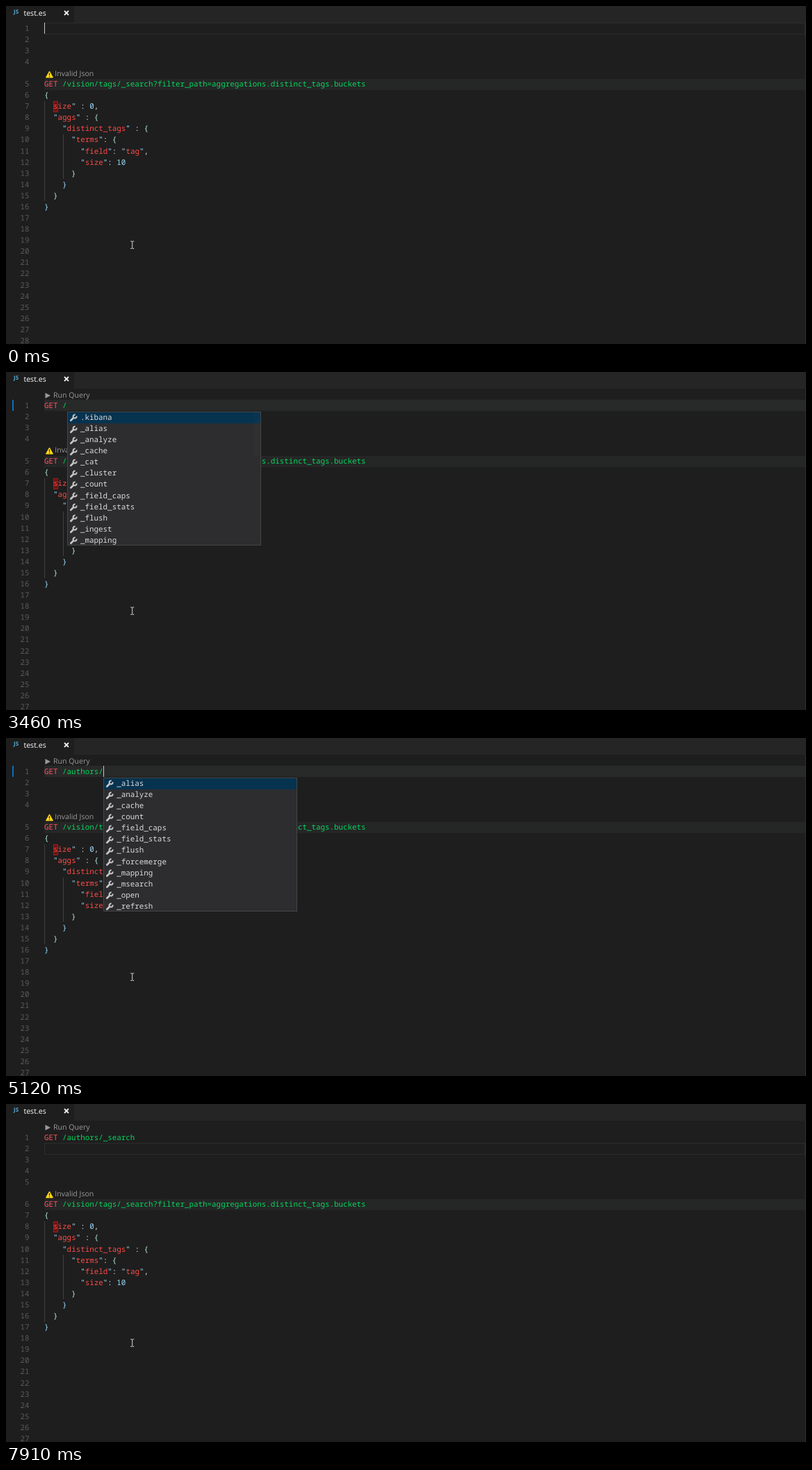
Animation, 1151 px wide and 487 px high, one loop 8000 ms. Source, as an HTML page:

```html
<!DOCTYPE html>
<html lang="en">
<head>
<meta charset="utf-8">
<title>test.es</title>
<style>
html, body { margin: 0; width: 100%; height: 100%; overflow: hidden; background: #1e1e1e; }
#stage { position: relative; width: 1151px; height: 487px; overflow: hidden; background: #1e1e1e;
  font: 500 10.875px/16.08px "Noto Sans Mono", "DejaVu Sans Mono", monospace;
  text-rendering: geometricPrecision; font-variant-ligatures: none; }
#stage div, #stage svg { position: absolute; white-space: pre; box-sizing: border-box; }
#stage .ui { font: 10.6px/16px "Open Sans", "Noto Sans", sans-serif; }
#tabs { left: 0; top: 0; width: 1151px; height: 24px; background: #252526; }
#tab { left: 0; top: 0; width: 98px; height: 24px; background: #1e1e1e; color: #fff; }
#edge { left: 1150px; top: 24px; width: 1px; height: 463px; background: #303031; }
.num, .code { margin-top: 0.6px; }
.num { left: 0; width: 33.5px; text-align: right; color: #5a5a5a; font-weight: 400; }
.code { left: 55px; color: #dcdcdc; }
.band { left: 55px; width: 1095px; height: 16px; }
.guide { width: 1px; background: #404040; }
.err { left: 68px; width: 7px; height: 16px; background: #6e1212; border: 1px solid #a01c1c; }
.lens { color: #999; height: 16px; }
.caret { width: 1px; height: 16px; background: #c4c4c2; }
.bar { left: 9px; width: 2px; background: #0b6fb8; }
.pop { width: 279px; background: #2d2d30; border: 1px solid #454545; color: #dcdcdc; overflow: hidden; }
.pop .item { left: 0; width: 277px; height: 16.08px; padding-left: 18px; }
.pop .item:first-child { background: #063350; }
.pop svg { left: 2px; top: 2.5px; }
.pop b { font-weight: 700; color: #0097fb; }
.thumb { right: 0; top: 0; width: 9px; background: #797979; }
.m { color: #ff525c; } .p { color: #04d75c; } .k { color: #ff4a46; }
.q { color: #9cdcfe; } .t { color: #b4e6dc; }
</style>
</head>
<body>
<div id="stage">
  <div id="tabs"><div id="tab" class="ui">
    <div style="left:11px;top:1px;font-size:8px;font-weight:700;color:#56a9d2">JS</div>
    <div style="left:25.4px;top:2.6px">test.es</div>
    <svg style="left:83px;top:6px" width="8" height="8"><path d="M1 1L7 7M7 1L1 7" stroke="#f0f0f0" stroke-width="1.8"/></svg>
  </div></div>
  <div id="view" style="left:0;top:0;width:1151px;height:487px"></div>
  <div id="edge"></div>
  <svg style="left:177px;top:338px" width="10" height="13"><path d="M2.2 1H4.1L4.7 1.7L5.3 1H7.2M4.7 1.5V10.8M2.2 11.4H4.1L4.7 10.7L5.3 11.4H7.2" fill="none" stroke="#d8d8d8"/></svg>
</div>
<script>
const LOOP = 8000, ROW = 16.08, CHAR = 6.525;
const view = document.getElementById('view');
const top0 = row => 24.1 + ROW * row;
const colX = col => 55.4 + CHAR * col;

const words = s => s.split(' ');
const lists = {
  verb: ['GET'],
  root: words('.kibana _alias _analyze _cache _cat _cluster _count _field_caps _field_stats _flush _ingest _mapping'),
  index: ['authors'],
  api: words('_alias _analyze _cache _count _field_caps _field_stats _flush _forcemerge _mapping _msearch _open _refresh'),
  s: words('_search _search_shards _segments _settings _shard_stores _stats _field_stats _msearch _flush _alias _refresh _field_caps'),
  se: words('_search _search_shards _segments _settings _shard_stores _msearch _cluster _suggest _search_template _msearch_template')
};

const body = [
  'GET /vision/tags/_search?filter_path=aggregations.distinct_tags.buckets',
  '{', '  size" : 0,', '  "aggs" : {', '    "distinct_tags" : {', '      "terms": {',
  '        "field": "tag",', '        "size": 10', '      }', '    }', '  }', '}'
];

// pop: [list, column, matched text, thumb height]
const steps = [
  [0, { text: '', caret: 1, pop: null, band: 0, lens: 0, bar: 0, enter: 0, nudge: 0.5 }],
  [60, { caret: 0 }],
  [600, { caret: 1 }],
  [910, { text: 'G' }],
  [1070, { text: 'GE' }],
  [1140, { pop: ['verb', 2, 'GE'] }],
  [1215, { text: 'GET' }],
  [1290, { pop: ['verb', 3, 'GE'] }],
  [1520, { pop: ['verb', 3, 'GET'] }],
  [1750, { text: 'GET ', pop: null }],
  [2060, { text: 'GET /' }],
  [2280, { pop: ['root', 5, '', 62], bar: 1, band: 2 }],
  [2360, { lens: 1, band: 1, nudge: 0 }],
  [2580, { caret: 0 }],
  [2990, { caret: 1 }],
  [3460, { caret: 0 }],
  [3660, { text: 'GET /a', caret: 1, pop: ['index', 6, 'a'] }],
  [3830, { text: 'GET /au', pop: ['index', 7, 'au'] }],
  [4290, { text: 'GET /authors', pop: null, nudge: 0.5 }],
  [4370, { nudge: 0 }],
  [4830, { text: 'GET /authors/' }],
  [4890, { nudge: 0.7 }],
  [5120, { pop: ['api', 13, ''] }],
  [5200, { pop: ['api', 13, '', 178] }],
  [5430, { caret: 0 }],
  [5570, { text: 'GET /authors/_', caret: 1, pop: ['api', 14, '', 178] }],
  [5800, { pop: ['api', 14, '_', 178] }],
  [5940, { text: 'GET /authors/_s', pop: ['s', 15, '_s', 178] }],
  [6020, { text: 'GET /authors/_se', pop: ['s', 16, '_s', 178] }],
  [6080, { pop: ['se', 16, '_se'] }],
  [6470, { caret: 0 }],
  [6620, { text: 'GET /authors/_search', caret: 1, pop: null, nudge: 0 }],
  [7080, { caret: 0 }],
  [7460, { enter: 1, caret: 1, band: 0 }],
  [7530, { nudge: 0.7 }],
  [7750, { bar: 0 }],
  [7910, { caret: 0 }]
];
let last = {};
const states = steps.map(([at, patch]) => ({ at, s: (last = { ...last, ...patch }) }));

const box = (cls, style, html = '') => `<div class="${cls}" style="${style}">${html}</div>`;
const span = (cls, s) => `<span class="${cls}">${s}</span>`;
const request = s => span('m', s.slice(0, 3)) + span('p', s.slice(3));
const json = s => s.replace(/[a-z_]+|"|\d+|[{}]/g, w =>
  span(/[a-z]/.test(w) ? 'k' : w === '{' ? 't' : w === '}' ? (s.length % 4 === 3 ? 't' : 'q') : 'q', w));

// Marks the letters of q in order inside a label.
function mark(label, q) {
  let i = 0;
  return [...label].map(c => c === q[i] ? (i++, `<b>${c}</b>`) : c).join('');
}

const wrench = '<svg width="12" height="12"><path d="M2.3 9.7L6 6" stroke="#c5c5c5" stroke-width="2.7" stroke-linecap="round"/>' +
  '<path d="M8.6 1.6A2.5 2.5 0 1 0 10.5 3.5" fill="none" stroke="#c5c5c5" stroke-width="2.1"/></svg>';
const play = '<svg style="left:0;top:3px" width="9" height="10"><path d="M.5 1L8 5L.5 9Z" fill="#999"/></svg>';
const warn = '<svg style="left:0;top:3px" width="12" height="11"><path d="M5.5 1L10.5 10H.5Z" fill="#ffd91a" stroke="#ffd91a" stroke-linejoin="round"/>' +
  '<path d="M5.5 3.5V7M5.5 8V9.3" stroke="#222" stroke-width="1.2"/></svg>';

function popup([name, col, q, thumb], row) {
  const items = lists[name];
  const rows = items.map((w, i) => box('item', `top:${i * ROW}px`, wrench + mark(w, q))).join('');
  const bar = thumb ? box('thumb', `height:${thumb}px;opacity:${name === 'root' ? 0.12 : 0.5}`) : '';
  return box('pop', `left:${colX(col)}px;top:${top0(row) + 0.7}px;height:${items.length * ROW + 0.4}px`, rows + bar);
}

function draw(s) {
  const first = s.lens, gap = first + 4 + s.enter, head = gap + 1;
  const caretRow = first + s.enter;
  const out = [];
  const y = r => `top:${top0(r)}px;`;
  const fill = c => `background:${c};`;

  out.push(box('band', y(head) + fill('#252626')));
  if (s.band) out.push(box('band', y(first) + fill(s.band === 2 ? '#2d2d2d' : '#282929')));
  else out.push(box('band', y(caretRow) + 'height:16.5px;border:1px solid #2c2c2c'));

  const guide = (col, from, n) => out.push(box('guide', `left:${Math.round(colX(col))}px;${y(head + from)}height:${n * ROW}px`));
  guide(0, 2, 9);
  guide(4, 5, 4);

  for (let r = first, n = 1; r < 29; r++) {
    if (r !== gap) out.push(box('num', y(r), n++));
  }
  out.push(box('err', y(head + 2)));
  out.push(box('code', y(first), request(s.text)));
  body.forEach((line, i) => out.push(box('code', y(head + i), i ? json(line) : request(line))));

  if (s.lens) out.push(box('ui lens run', `left:56px;top:${top0(0) + 1.5}px`, play + '<div style="left:11.9px">Run Query</div>'));
  out.push(box('ui lens', `left:57px;top:${top0(gap) + 0.8 + s.nudge}px`, warn + '<div style="left:13.3px">Invalid Json</div>'));

  if (s.bar) out.push(box('bar', y(first) + `height:${ROW * (1 + s.enter)}px`));
  if (s.caret) out.push(box('caret', y(caretRow) + `left:${colX(s.enter ? 0 : s.text.length)}px`));
  if (s.pop) out.push(popup(s.pop, first + 1));
  view.innerHTML = out.join('');
}

let shown = null;
function frame() {
  const t = performance.now() % LOOP;
  let now = states[0];
  for (const st of states) if (st.at <= t) now = st;
  if (now !== shown) draw((shown = now).s);

  // The lens fades in while the list's scrollbar fades out.
  const fade = Math.min(1, Math.max(0, (t - 2920) / 540));
  const run = view.querySelector('.run'), thumb = view.querySelector('.thumb');
  if (run) run.style.opacity = fade;
  if (thumb && now.s.pop[0] === 'root') thumb.style.opacity = 0.12 - 0.09 * fade;
  requestAnimationFrame(frame);
}
frame();
</script>
</body>
</html>
```
